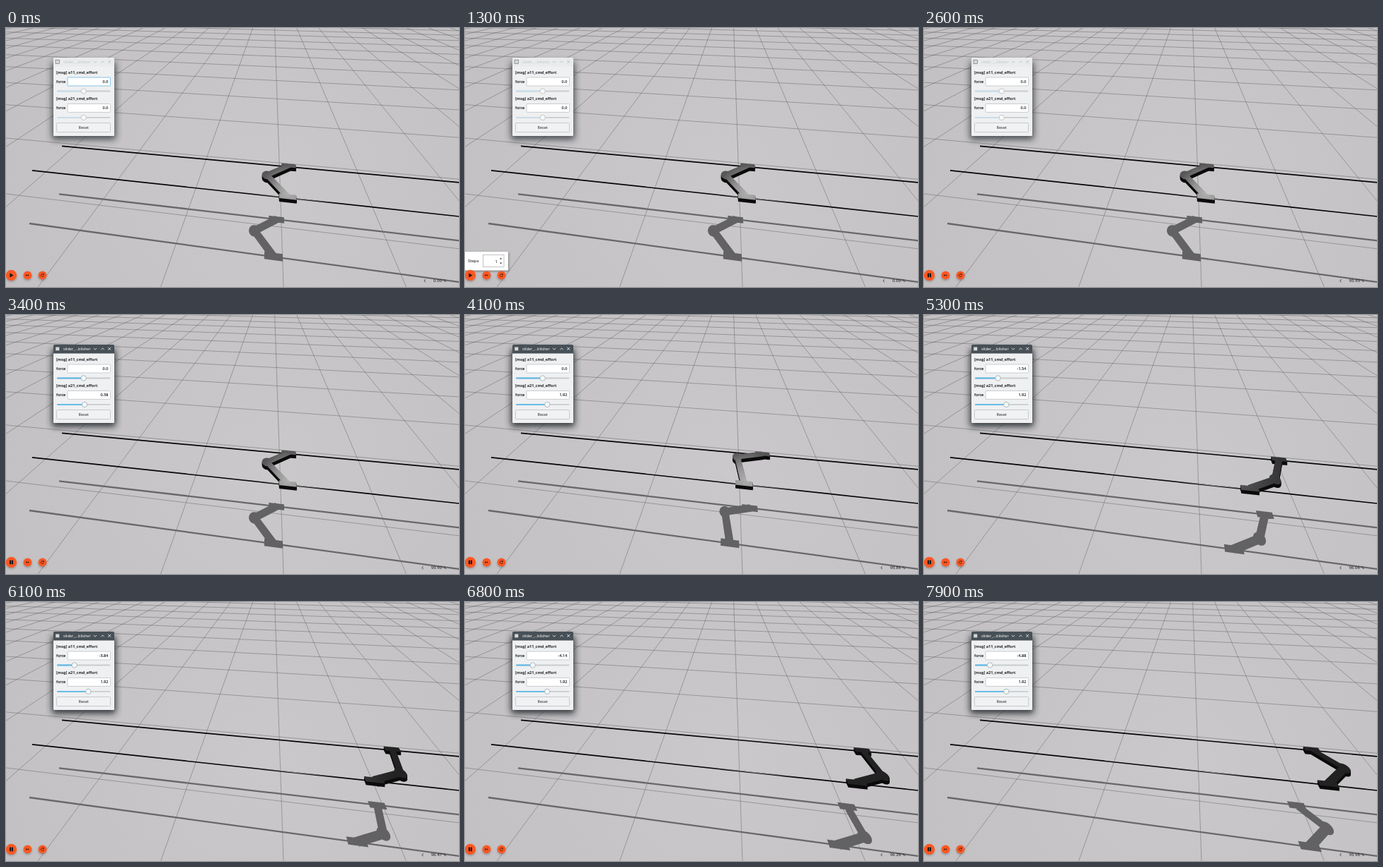
An HTML page that plays this animation: 640 px wide and 367 px high, repeating every 8 s.

```html
<!DOCTYPE html>
<html lang="en">
<head>
<meta charset="utf-8">
<title>Slider force control</title>
<style>
  html, body { margin: 0; width: 100%; height: 100%; overflow: hidden; background: #c6c4c6; }
  svg { display: block; width: 640px; height: 367px; }
  .ui { font: 5.5px "Noto Sans", sans-serif; fill: #232629; }
  .sim { font: 6.2px Roboto, sans-serif; fill: #222; }
  .end { text-anchor: end; }
  .mid { text-anchor: middle; }
  .bold { font-weight: bold; }
  .firm { stroke: #232629; stroke-width: .16; }
  .line { fill: none; }
</style>
</head>
<body>
<svg viewBox="0 0 640 367">
  <defs>
    <radialGradient id="floor" gradientUnits="userSpaceOnUse" cx="370" cy="220" r="430">
      <stop offset="0" stop-color="#cac8ca"/><stop offset="1" stop-color="#c2c0c2"/>
    </radialGradient>
    <radialGradient id="metal" gradientUnits="userSpaceOnUse" cx="398" cy="236" r="150">
      <stop offset="0" stop-color="#b0b0b0"/><stop offset=".13" stop-color="#929292"/>
      <stop offset=".27" stop-color="#585858"/><stop offset=".55" stop-color="#404042"/>
      <stop offset="1" stop-color="#222"/>
    </radialGradient>
    <radialGradient id="glint" gradientUnits="userSpaceOnUse" cx="408" cy="242" r="60">
      <stop offset="0" stop-color="#bbb"/><stop offset="1" stop-color="#bbb" stop-opacity="0"/>
    </radialGradient>
    <filter id="soft" x="-20%" y="-20%" width="140%" height="140%"><feGaussianBlur stdDeviation=".7"/></filter>
    <filter id="drop" x="-30%" y="-30%" width="160%" height="160%"><feGaussianBlur stdDeviation="5"/></filter>
    <filter id="dropSmall" x="-20%" y="-40%" width="140%" height="180%"><feGaussianBlur stdDeviation="1.5"/></filter>
  </defs>
  <rect width="640" height="367" fill="url(#floor)"/>
  <path id="grid" class="line" stroke="#555" stroke-width=".5" stroke-opacity=".85"/>
  <g filter="url(#soft)" stroke="#686769">
    <path class="line" stroke-width="2.3" d="M75 235.3L645 301.8M33 277L645 360.7"/>
    <path id="shade" fill="#626163" stroke="#626163" stroke-width="2.4"/>
  </g>
  <path class="line" stroke="#050505" stroke-width="1.7" d="M79 167.3L640 218.8M37 201.8L640 267"/>
  <path class="line" stroke="url(#glint)" stroke-width=".9" d="M340 234L480 249.2"/>
  <g id="sides" fill="#0b0b0b"></g>
  <path id="top" fill="url(#metal)"/>

  <g class="ui">
    <rect id="winShadow" x="65" y="48" width="90" height="110" rx="3" filter="url(#drop)"/>
    <rect x="67" y="42" width="86" height="111" rx="1.5" fill="#eff0f1"/>
    <path id="bar" d="M67 54.5V43.5Q67 42 68.5 42H151.5Q153 42 153 43.5V54.5Z"/>
    <rect x="70" y="45.2" width="5.4" height="5.4" fill="#d8d8d8" stroke="#666" stroke-width=".6"/>
    <text id="title" x="81" y="50">slider_...blisher</text>
    <path id="winIcons" class="line" stroke-width=".8"
      d="M123.8 47L126 49.2L128.2 47M134.3 49.2L136.5 47L138.7 49.2M144.2 45.8L148.2 49.8M148.2 45.8L144.2 49.8"/>
    <g id="panel"></g>
    <rect x="71.5" y="134.5" width="76" height="13" rx="1" fill="#f1f2f3" stroke="#bcbfc1" stroke-width=".8"/>
    <text class="mid" x="109.6" y="143.2">Reset</text>
  </g>

  <g id="popup" class="sim">
    <rect x="-3" y="318" width="65" height="27" fill="#000" opacity=".35" filter="url(#dropSmall)"/>
    <rect x="-2" y="317" width="63" height="26.5" fill="#fff"/>
    <text x="4" y="332.3">Steps</text>
    <rect x="25.5" y="321.5" width="29.5" height="17" fill="#fff" stroke="#aaa" stroke-width=".7"/>
    <text class="end" x="46" y="332.5">1</text>
    <path fill="#333" d="M49 327.6L50.6 325.6L52.2 327.6ZM49 332.6L50.6 334.6L52.2 332.6Z"/>
  </g>
  <g fill="#000" opacity=".25" filter="url(#dropSmall)">
    <circle cx="7.5" cy="352" r="7.6"/><circle cx="30.5" cy="352" r="6"/><circle cx="51.5" cy="352" r="6"/>
  </g>
  <g fill="#ff5722">
    <circle cx="7.5" cy="350.4" r="7.6"/><circle cx="30.5" cy="350.4" r="5.9"/><circle cx="51.5" cy="350.4" r="5.9"/>
  </g>
  <path id="play" fill="#1a1a1a"/>
  <path fill="#3a1a10" d="M28 349L30.3 350.4L28 351.8ZM30.6 349L32.9 350.4L30.6 351.8Z"/>
  <path class="line" stroke="#3a1a10" stroke-width=".8" d="M53.4 350.6A2 2 0 1 1 52.6 348.8M53.4 347.8V349.5H51.7"/>
  <path id="chevron" class="line" stroke="#222" stroke-width=".8" d="M1 -2L-.8 0L1 2"/>
  <text id="rate" class="sim end" x="622" y="360.2"></text>
</svg>
<script>
const $ = id => document.getElementById(id);
const set = (id, attrs) => { for (const k in attrs) $(id).setAttribute(k, attrs[k]); };

// Perspective: both grid directions meet the horizon at y = HORIZON
const HORIZON = -80, NEAR_X = 377, SIDE_X = -2590;

function drawGrid() {
  let d = '';
  for (let k = -30; k <= 30; k++) {
    d += `M${NEAR_X} ${HORIZON}L${NEAR_X + 460 * (0.0336 + 0.388 * k)} ${HORIZON + 460}`;
  }
  for (let j = -2; j < 14; j++) {
    const w = 1 / (0.003175 + 0.001063 * j);
    d += `M0 ${HORIZON + w}L640 ${HORIZON + w * (1 - 640 / SIDE_X)}`;
  }
  set('grid', { d });
}

// Maps plane coordinates (x along the rails, y towards the viewer) to pixels
const STEP_X = -0.01274, STEP_Y = -0.1104;
const plane = (k, c, ox) => (x, y) => {
  const s = k + STEP_X * x + STEP_Y * y;
  return [(ox + SIDE_X * STEP_X * x + NEAR_X * STEP_Y * y) / s, c / s + HORIZON];
};
const onRails = plane(1, 299, 392);
const floorPlane = plane(1.0593, 400.2, 395.5);
const onFloor = (x, y) => floorPlane(x * 1.035, y);

// Smooth curve through [time, value] keys
function curve(keys, t) {
  const n = keys.length - 1;
  if (t <= keys[0][0]) return keys[0][1];
  if (t >= keys[n][0]) return keys[n][1];
  const i = keys.findIndex(k => k[0] > t) - 1;
  const slope = j => j < 1 || j >= n ? 0
    : (keys[j + 1][1] - keys[j - 1][1]) / (keys[j + 1][0] - keys[j - 1][0]);
  const [t0, a] = keys[i], [t1, b] = keys[i + 1];
  const h = t1 - t0, u = (t - t0) / h, v = 1 - u;
  return a * v * v * (1 + 2 * u) + b * u * u * (3 - 2 * u)
    + h * u * v * (v * slope(i) - u * slope(i + 1));
}

function linear(keys, t) {
  const i = keys.findIndex(k => k[0] > t);
  if (i < 0) return keys[keys.length - 1][1];
  if (i === 0) return keys[0][1];
  const [t0, a] = keys[i - 1], [t1, b] = keys[i];
  return a + (b - a) * (t - t0) / (t1 - t0);
}

const CENTER = [[3400, .185], [4100, .43], [4700, 1.32], [5300, 2.33], [6100, 3.6], [7200, 4.35], [7900, 4.19]];
const BEND = [[3400, 50], [4100, 41.9], [4750, 6], [5300, -21.5], [6100, -31.3], [7900, -50]];
const FORCE1 = [[4300, 0], [4800, -.92], [5000, -1.54], [5350, -1.54], [5700, -2.69], [6000, -3.84],
  [6700, -3.84], [7450, -6.1], [7800, -4.88]];
const FORCE2 = [[3300, 0], [3800, 1.92]];
const RATE = [[2000, 95.6], [2600, 95.95], [4100, 95.86], [5300, 96.06], [6100, 96.47], [7900, 95.98]];

const FAR = -.755, CLOSE = .602, LINK = 1.06;

function armShapes(t) {
  const cx = curve(CENTER, t), bend = curve(BEND, t) * Math.PI / 180;
  const gap = CLOSE - FAR, span = 2 * LINK * Math.cos(bend);
  const dx = Math.sqrt(Math.max(0, span * span - gap * gap));
  const far = [cx + dx / 2, FAR], close = [cx - dx / 2, CLOSE];
  const off = LINK * Math.sin(bend) / Math.hypot(dx, gap);
  const elbow = [cx - off * gap, (FAR + CLOSE) / 2 - off * dx - .05];

  const box = (x, y, a, w, h) => [[-w, -h], [w, -h], [w, h], [-w, h]].map(([u, v]) =>
    [x + u * Math.cos(a) - v * Math.sin(a), y + u * Math.sin(a) + v * Math.cos(a)]);
  const link = (p, q) => box((p[0] + q[0]) / 2, (p[1] + q[1]) / 2,
    Math.atan2(q[1] - p[1], q[0] - p[0]), LINK / 2, .115);
  const disc = Array.from({ length: 24 }, (_, i) =>
    [elbow[0] + .19 * Math.cos(i * Math.PI / 12), elbow[1] + .19 * Math.sin(i * Math.PI / 12)]);
  return [link(far, elbow), link(close, elbow), disc,
    box(...far, 0, .28, .09), box(...close, 0, .3, .09)];
}

const toPath = (shapes, map) => shapes.map(s =>
  'M' + s.map(p => map(...p).map(n => n.toFixed(2)).join(' ')).join('L') + 'Z').join('');

const DEPTH = [3, 2, 1, 0, -1];
$('sides').innerHTML = DEPTH.map(y => `<path transform="translate(0 ${y})"/>`).join('');
set('top', { transform: 'translate(0 -2)' });

$('panel').innerHTML = [1, 2].map(n => {
  const y = (n - 1) * 37.4;
  return `<g transform="translate(0 ${y})">
    <text class="bold" x="71" y="64.7">[msg] a${n}1_cmd_effort</text>
    <text class="firm" x="71" y="78">force</text>
    <rect id="field${n}" x="87" y="70" width="60.5" height="12" rx="1" fill="#fff" stroke="#bfc2c4" stroke-width=".8"/>
    <text id="value${n}" class="end firm" x="144.3" y="78"></text>
    <rect x="72" y="88.6" width="75.5" height="1.8" rx=".9" fill="#c9cccf"/>
    <rect id="fill${n}" x="72" y="88.6" height="1.8" rx=".9"/>
    <circle id="knob${n}" cy="89.5" r="3.7" fill="#f7f8f8" stroke-width=".7"/>
  </g>`;
}).join('');

const mix = (a, b, u) => `rgb(${a.map((v, i) => Math.round(v + (b[i] - v) * u))})`;

function drawSlider(n, value, focus) {
  const x = 109.7 + 3.4 * value;
  $('value' + n).textContent = Math.abs(value) < .005 ? '0.0' : value.toFixed(2);
  set('fill' + n, { width: x - 72, fill: mix([199, 222, 236], [90, 184, 232], focus) });
  set('knob' + n, { cx: x, stroke: mix([178, 182, 185], [140, 165, 180], focus) });
}

function draw(t) {
  const shapes = armShapes(t), d = toPath(shapes, onRails);
  for (const p of $('sides').children) p.setAttribute('d', d);
  set('top', { d });
  set('shade', { d: toPath(shapes, onFloor) });

  const focus = linear([[2850, 0], [3150, 1]], t);
  set('bar', { fill: mix([233, 235, 236], [71, 80, 87], focus) });
  set('title', { fill: mix([195, 198, 200], [252, 252, 252], focus) });
  set('winIcons', { stroke: mix([184, 187, 190], [252, 252, 252], focus) });
  set('winShadow', { opacity: .75 + .15 * focus });
  set('field1', { stroke: mix([105, 184, 228], [191, 194, 196], linear([[100, 0], [300, 1]], t)) });
  drawSlider(1, linear(FORCE1, t), focus);
  drawSlider(2, linear(FORCE2, t), focus);

  const running = t >= 2000;
  set('popup', { opacity: linear([[500, 0], [700, 1], [1700, 1], [1900, 0]], t) });
  set('play', { d: running ? 'M5 347.4H7.2V353.2H5ZM7.9 347.4H10.1V353.2H7.9Z' : 'M5.4 347.2L10.6 350.4L5.4 353.6Z' });
  set('chevron', { transform: `translate(${running ? 588.5 : 591.7} 358.2)` });
  $('rate').textContent = (running ? linear(RATE, t) : 0).toFixed(2) + ' %';
}

drawGrid();
function tick() {
  draw(Math.floor(performance.now() % 8000 / 100) * 100);
  requestAnimationFrame(tick);
}
tick();
</script>
</body>
</html>
```
